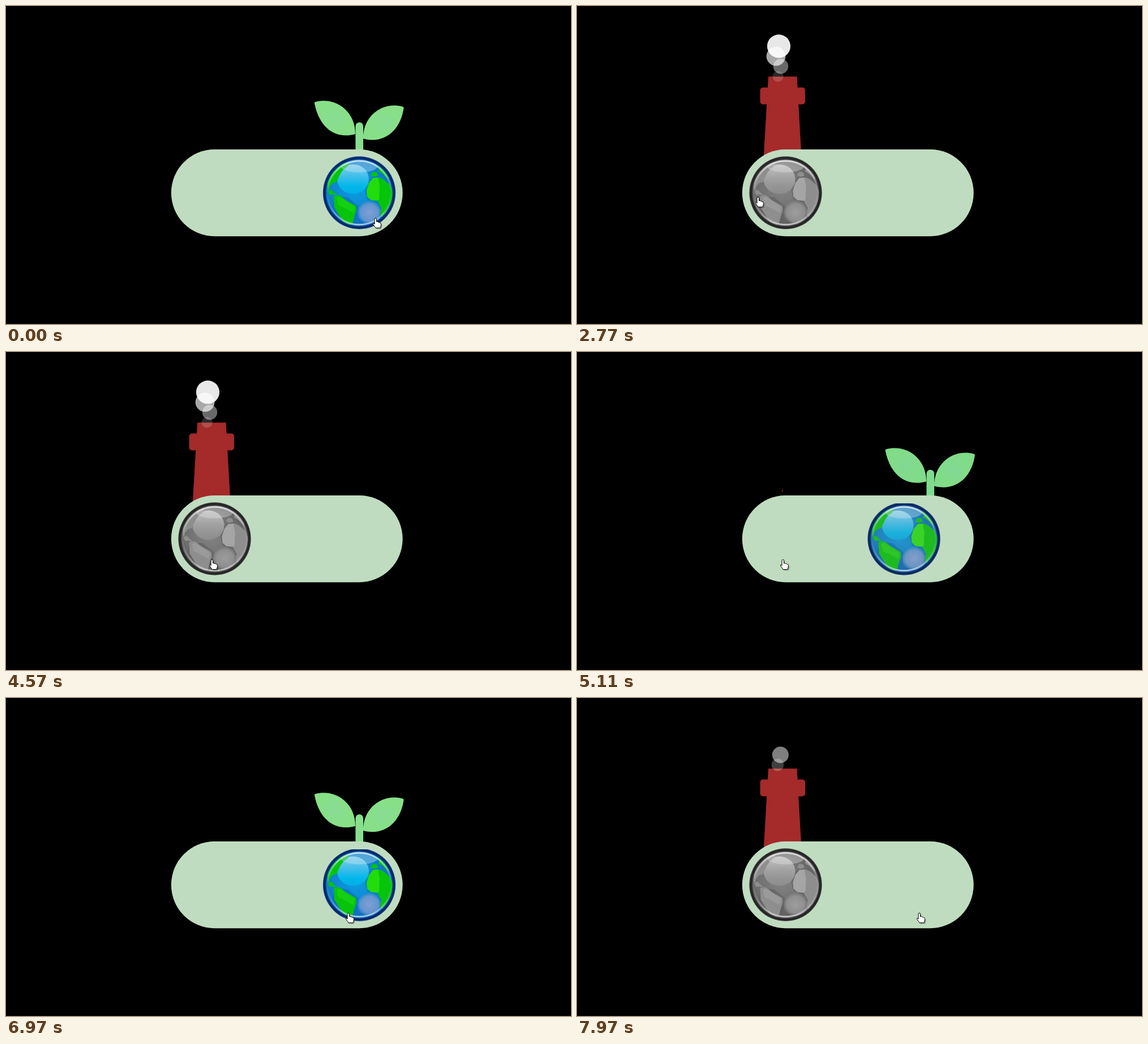
These frames come from a looping animation (998 px wide and 561 px high, 8000 ms). An HTML page:

```html
<!DOCTYPE html>
<html lang="en">
<head>
<meta charset="utf-8">
<title>Planet toggle</title>
<style>
  html, body { margin: 0; width: 100%; height: 100%; overflow: hidden; background: #000; }
  svg { display: block; width: 100vw; height: 100vh; }
</style>
</head>
<body>
<svg viewBox="0 0 998 561">
  <defs>
    <radialGradient id="leaf">
      <stop offset="0" stop-color="#88dc94"/>
      <stop offset=".8" stop-color="#87e087"/>
    </radialGradient>
    <radialGradient id="sea" cx=".45" cy=".45" r=".58">
      <stop offset="0" stop-color="#0c9ce0"/>
      <stop offset=".6" stop-color="#0e86d0"/>
      <stop offset="1" stop-color="#1066b8"/>
    </radialGradient>
    <linearGradient id="gloss" x2="0" y2="1">
      <stop offset="0" stop-color="#84d0f0"/>
      <stop offset=".45" stop-color="#38bcea"/>
      <stop offset=".75" stop-color="#00b8ea"/>
      <stop offset="1" stop-color="#04ace6"/>
    </linearGradient>
    <linearGradient id="rim" x2="0" y2="1">
      <stop offset="0" stop-color="#d8eef4" stop-opacity=".85"/>
      <stop offset=".3" stop-color="#b4dcec" stop-opacity=".4"/>
      <stop offset=".5" stop-color="#8cc8ec" stop-opacity=".05"/>
      <stop offset=".75" stop-color="#a8d0ec" stop-opacity=".3"/>
      <stop offset="1" stop-color="#c0dcec" stop-opacity=".8"/>
    </linearGradient>
    <radialGradient id="haze">
      <stop offset="0" stop-color="#80a0d4"/>
      <stop offset=".75" stop-color="#6c98d0" stop-opacity=".9"/>
      <stop offset="1" stop-color="#4c90cc" stop-opacity=".4"/>
    </radialGradient>
    <clipPath id="disc"><circle r="58.5"/></clipPath>
    <clipPath id="trim"><rect x="-66" y="-62.5" width="132" height="130"/></clipPath>
  </defs>

  <rect width="998" height="561"/>
  <rect y="560" width="998" height="1" fill="#0d0d0d"/>

  <g id="plant" fill="url(#leaf)">
    <rect x="617.4" y="205.3" width="13.6" height="80" rx="6.8" fill="#87df8e"/>
    <path d="M545 172Q544.4 169.6 547 169C583 160 617.5 186 617 226C579 236 553 212 545 172Z"/>
    <path d="M702.5 180Q703 178 700.5 177.4C664.7 168 630.2 194 631 234C668.8 244 697 219 702.5 180Z"/>
  </g>

  <g id="chimney" fill="#a52a2a">
    <path d="M338 124.5H388.5L402 364.5H324Z"/>
    <rect x="323.5" y="143.8" width="79.5" height="29.6" rx="5"/>
  </g>
  <g id="smoke" fill="#fff"></g>

  <rect x="291.8" y="253" width="408.8" height="153.2" rx="76.6" fill="#c0dcc0"/>

  <g id="globe">
    <g id="ball">
      <circle r="64.2" fill="#1c4c88"/>
      <circle r="63.2" fill="#06286a"/>
      <circle r="59.4" fill="#0a58ac"/>
      <g clip-path="url(#disc)">
        <circle r="58" fill="url(#sea)"/>
        <path d="M-42 6L-20 8L-1 24L-3 50L-14 58L-38 46L-48 24Z" fill="#1070c0" opacity=".7"/>
        <path d="M10 -4L14 -20L26 -30L40 -28L34 18L14 12Z" fill="#1274c4" opacity=".7"/>
        <ellipse cx="-11" cy="-24" rx="28" ry="26" fill="url(#gloss)"/>
        <ellipse cx="18" cy="35" rx="21" ry="20" fill="url(#haze)"/>
        <g fill="#06c40a">
          <path d="M-56 -8L-56 -24L-46 -40L-32 -50L-18 -54L-20 -47L-28 -41L-33 -34L-37 -26L-40 -19L-47 -17L-52 -11L-54 -2Z"/>
          <path d="M-55 -2L-50 -6L-46 -2L-42 2L-39 5L-46 3L-52 4Z"/>
          <path d="M-45 6L-37 4L-31 7L-24 13L-15 18L-6 23L-5 31L-9 43L-12 55L-19 57L-28 52L-36 39L-44 26Z"/>
          <path d="M13 -4L17 -17L24 -26L36 -27L44 -23L54 -14L60 0L58 16L48 33L40 43L37 38L39 27L32 14L21 13L14 7Z"/>
          <path d="M20 -31L24 -37L31 -36L33 -30L26 -28Z"/>
          <path d="M29 -49L38 -48L47 -39L55 -27L51 -24L42 -33L34 -38L36 -43Z"/>
        </g>
        <path d="M13 -4L17 -17L24 -26L33 -27L36 -12L35 12L32 14L21 13L14 7Z" fill="#22dc0c"/>
        <path d="M-40 9L-35 7L-28 11L-18 18L-8 25L-10 36L-17 32L-28 26L-37 22Z" fill="#14d010"/>
        <ellipse cx="0" cy="-46" rx="32" ry="10" fill="#c4e4f0" opacity=".38"/>
      </g>
      <circle r="56.2" fill="none" stroke="url(#rim)" stroke-width="3"/>
    </g>
  </g>

  <g id="cursor">
    <path id="hand" fill="#444" opacity=".45" transform="translate(2 2)" d="M-2 10V1.2Q-2 -.8 -.3 -.8Q1.5 -.8 1.5 1.2V5.6Q3.8 4.8 4.4 6.4Q6.5 5.7 7.2 7.4Q9.4 7 9.4 9.4V11.5Q9.2 14 7.6 16.6H-.2Q-1 14.4 -3.2 12Q-5.6 9.2 -4.4 8.4Q-3.2 7.8 -2 10Z"/>
  </g>
</svg>

<script>
const LOOP = 8000;
const $ = id => document.getElementById(id);

// The skin reuses the shadow's outline without its offset.
const skin = $('hand').cloneNode();
['id', 'transform', 'opacity'].forEach(name => skin.removeAttribute(name));
set(skin, { fill: '#fff', stroke: '#000', 'stroke-width': 1 });
$('cursor').append(skin);

const clicks = [
  { at: 1133, press: 1090, on: true },
  { at: 4698, press: 4680, on: false },
  { at: 7075, press: 6970, on: true }
];
const MOVE = 800, SWAP = 500, RISE = 1800, PUFFS = 4;

// time, x, y of the fingertip
const pointer = [
  [0, 653, 375], [1500, 653, 375], [1890, 414, 356], [2400, 320, 338],
  [3520, 320, 338], [3900, 350, 371], [4200, 364, 367],
  [5750, 364, 367], [5830, 419, 360], [6110, 419, 360],
  [6250, 452, 354], [6600, 605, 380], [LOOP, 605, 380]
];

const puffs = Array.from({ length: PUFFS }, () =>
  $('smoke').appendChild(document.createElementNS('http://www.w3.org/2000/svg', 'circle')));

const lerp = (a, b, k) => a + (b - a) * k;
const cubic = (a, b, u) => 3 * (1 - u) ** 2 * u * a + 3 * (1 - u) * u * u * b + u ** 3;

// CSS "ease"
function ease(x) {
  if (x <= 0) return 0;
  if (x >= 1) return 1;
  let lo = 0, hi = 1;
  for (let i = 0; i < 24; i++) {
    const mid = (lo + hi) / 2;
    if (cubic(.25, .25, mid) < x) lo = mid; else hi = mid;
  }
  return cubic(.1, 1, lo);
}

function progress(click, t, span) {
  if (!click) return 0;
  const k = ease((t - click.at) / span);
  return click.on ? k : 1 - k;
}

function set(el, attrs) {
  for (const name in attrs) el.setAttribute(name, attrs[name]);
}

function drawSmoke(click, t) {
  puffs.forEach((puff, i) => {
    const age = click && click.on ? t - click.at - i * RISE / PUFFS : -1;
    const k = age < 0 ? 0 : age % RISE / RISE;
    set(puff, {
      cx: (i % 2 ? 356.1 : 362.8) - 7 * k,
      cy: lerp(135.5, 64.5, k),
      r: lerp(7.2, 21.9, k),
      opacity: k
    });
  });
}

function drawPointer(t) {
  const i = pointer.findIndex(p => p[0] > t);
  const [t0, x0, y0] = pointer[i - 1], [t1, x1, y1] = pointer[i];
  const k = (t - t0) / (t1 - t0);
  set($('cursor'), { transform: `translate(${lerp(x0, x1, k)} ${lerp(y0, y1, k)})` });
}

function draw(t) {
  const click = clicks.filter(c => c.at <= t).pop();
  const moved = progress(click, t, MOVE);
  const swapped = progress(click, t, SWAP);

  // The top edge is cut off while the globe is in transition.
  const busy = clicks.some(c => t >= c.press && t < c.at + MOVE);
  set($('globe'), {
    transform: `translate(${lerp(624, 368.5, moved)} 329.5)`,
    'clip-path': busy ? 'url(#trim)' : 'none'
  });
  $('ball').style.filter = moved ? `grayscale(${moved})` : 'none';

  set($('chimney'), { transform: `translate(363 244.5) scale(${swapped}) translate(-363 -244.5)` });
  set($('plant'), {
    transform: `translate(624 ${179 + 127 * swapped}) scale(${1 + .2 * swapped}) translate(-624 -179)`,
    opacity: 1 - swapped
  });
  $('plant').style.filter = swapped ? `hue-rotate(${180 * swapped}deg)` : 'none';

  drawSmoke(click, t);
  drawPointer(t);
}

const start = performance.now();
function tick() {
  draw((performance.now() - start) % LOOP);
  requestAnimationFrame(tick);
}
tick();
</script>
</body>
</html>
```
